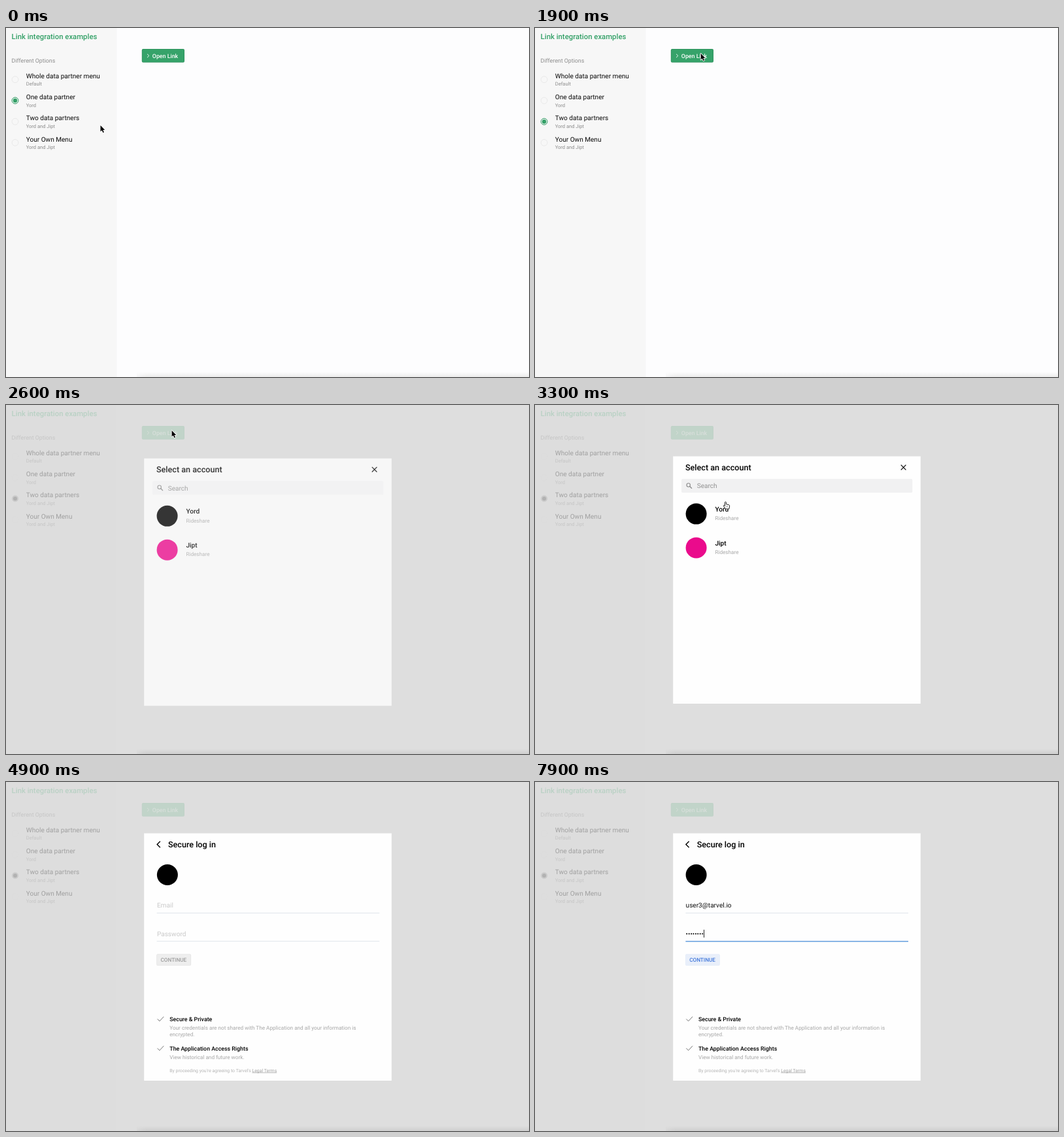
Write an HTML page with a canvas that moves like this. It is 800x534 px and loops after 8 s.

```html
<!DOCTYPE html>
<html lang="en">
<head>
<meta charset="utf-8">
<title>Link integration examples</title>
<style>
  html, body { margin: 0; height: 100%; overflow: hidden; background: #fdfdfe; }
  canvas { display: block; width: 100vw; height: 100vh; }
</style>
</head>
<body>
<canvas id="stage" width="800" height="534"></canvas>
<script>
const ctx = document.getElementById('stage').getContext('2d');
const LOOP = 8000;
const U = 0.63; // page zoom: sizes below are CSS px times U

const OPTIONS = [
  ['Whole data partner menu', 'Default'],
  ['One data partner', 'Yord'],
  ['Two data partners', 'Yord and Jipt'],
  ['Your Own Menu', 'Yord and Jipt'],
];
const ACCOUNTS = [['Yord', '#000'], ['Jipt', '#ea0b8c']];
const EMAIL = 'user3@tarvel.io';

const LIGHT = {
  side: '#f7f7f7', main: '#fdfdfe', green: '#33a067', btn: '#36a36a', edge: '#2d8f5b',
  btnText: '#fff', label: '#0a0a0a', sub: '#8c8c8c', ring: '#e7e7e7', shade: '#ececec',
};
const DIM = {
  side: '#dddddd', main: '#dedede', green: '#b9d1c4', btn: '#c1d4c9', edge: '#bfd1c7',
  btnText: '#d8dfdb', label: '#a0a0a0', sub: '#c5c5c5', ring: '#dcdcdc', shade: '#cecece',
};

// Pointer tip: time, x, y
const POINTER = [
  [0, 144.5, 149], [300, 89.8, 148.3], [1000, 89.8, 148.3], [1600, 266, 44],
  [1900, 253.6, 39], [3000, 253.6, 39], [3500, 312, 207], [3600, 312, 207],
  [4000, 266, 191], [4300, 298.3, 174.5],
];
const ARROW = new Path2D('M0 0V9.6L2.2 7.6L3.9 11.2L5.4 10.5L3.8 7.1H6.7Z');
const HAND = new Path2D('M-1 .9Q0-.6 1 .9V4L5 4.8Q6.4 5.2 6.2 7L5.4 11.2H.2L-3 6.9Q-3.4 5.4-2 5.6L-1 6.6Z');

const clamp = v => Math.max(0, Math.min(1, v));
const ramp = (t, from, to) => clamp((t - from) / (to - from));
const easeOut = u => 1 - (1 - u) ** 3;
const smooth = u => u * u * (3 - 2 * u);

// y is the middle of the capitals
function text(str, x, y, size, color, weight = 400) {
  const px = size * U;
  ctx.font = `${weight} ${px}px Roboto, sans-serif`;
  ctx.fillStyle = color;
  ctx.fillText(str, x, y + px * 0.355);
  return ctx.measureText(str).width;
}

function box(x, y, w, h, fill, r = 0) {
  ctx.fillStyle = fill;
  ctx.beginPath();
  ctx.roundRect(x, y, w, h, r);
  ctx.fill();
}

function disc(x, y, r, fill) {
  ctx.fillStyle = fill;
  ctx.beginPath();
  ctx.arc(x, y, r, 0, 7);
  ctx.fill();
}

function ring(x, y, r, color, width = 1) {
  ctx.strokeStyle = color;
  ctx.lineWidth = width;
  ctx.beginPath();
  ctx.arc(x, y, r, 0, 7);
  ctx.stroke();
}

function line(d, color, width) {
  ctx.strokeStyle = color;
  ctx.lineWidth = width;
  ctx.stroke(new Path2D(d));
}

function layer(alpha, dx, dy, draw) {
  if (alpha <= 0) return;
  ctx.save();
  ctx.globalAlpha = alpha;
  ctx.translate(dx, dy);
  draw();
  ctx.restore();
}

function radio(y, on, dim, c) {
  ring(14, y, 4.9, c.ring, 0.9);
  if (dim && on) {
    disc(14, y, 5, '#cbcbcb');
    disc(14, y, 3, '#b2b2b2');
  } else {
    layer(on, 0, 0, () => {
      ring(14, y, 4.9, c.green);
      disc(14, y, 3.2 * on, c.green);
    });
  }
}

function page(t, dim) {
  const c = dim ? DIM : LIGHT;
  box(0, 0, 800, 534, c.main);
  box(0, 0, 169.5, 534, c.side);
  const glow = ctx.createLinearGradient(0, 526, 0, 534);
  glow.addColorStop(0, c.main);
  glow.addColorStop(1, c.shade);
  box(200, 526, 600, 8, glow);
  const fade = ctx.createLinearGradient(190, 0, 215, 0);
  fade.addColorStop(0, c.main);
  fade.addColorStop(1, c.main + '00');
  box(190, 526, 25, 8, fade);

  text('Link integration examples', 8.6, 13.3, 18, c.green, 500);
  text('Different Options', 8.6, 50, 14, c.sub);
  const moved = ramp(t, 500, 700);
  OPTIONS.forEach(([label, sub], i) => {
    const y = 73.5 + i * 32.2;
    radio(y + 5.3, i === 1 ? 1 - moved : i === 2 ? moved : 0, dim, c);
    text(label, 30.7, y, 16, c.label);
    text(sub, 30.7, y + 12.3, 12, c.sub);
  });

  box(207.8, 32, 65.2, 20.8, c.edge, 2);
  box(208.5, 32.7, 63.8, 19.4, c.btn, 1.5);
  line('M216 39.8L218.8 42.5L216 45.2', c.btnText, 0.9);
  text('Open Link', 223.8, 42.6, 14, c.btnText, 500);
}

function spinner(t) {
  const head = 0.3 + (t - 2300) / 1000 * Math.PI * 2;
  const g = ctx.createConicGradient(head, 401, 267.5);
  g.addColorStop(0, 'rgba(80,80,80,0)');
  g.addColorStop(0.2, 'rgba(80,80,80,0)');
  g.addColorStop(0.5, 'rgba(80,80,80,.5)');
  g.addColorStop(1, 'rgba(60,60,60,1)');
  ring(401, 267.5, 15.3, g, 1.1);
}

function accountList() {
  text('Select an account', 230, 95.6, 20, '#000', 500);
  line('M559.8 91.7L567.4 99.3M567.4 91.7L559.8 99.3', '#000', 1.2);
  box(224, 113, 353.3, 21.3, '#f1f1f2', 2);
  ring(234.7, 122.5, 2.7, '#8b8b8b', 1.1);
  line('M236.7 124.5L240 127.8', '#8b8b8b', 1.3);
  text('Search', 247.7, 123.7, 16, '#929292');
  ACCOUNTS.forEach(([name, color], i) => {
    const y = 166.6 + i * 51.8;
    disc(246.6, y, 16, color);
    text(name, 275.4, y - 7, 16, '#000', 500);
    text('Rideshare', 275.4, y + 6.8, 13, '#a8a8a8');
  });
}

function underline(y, from, to) {
  box(230.4, y - 0.5, 340.6, 1, '#dfe5eb');
  const w = 340.6 * to;
  if (w > from) box(230.4, y - 0.6, w, 1.2, '#4b8fdc');
}

function caret(x, y) {
  box(x, y - 6, 0.9, 12, '#111');
}

function perk(y, title, ...rows) {
  line(`M231.4 ${y}L234.6 ${y + 3.4}L241 ${y - 3.6}`, '#777', 1);
  text(title, 250, y, 14, '#000', 500);
  rows.forEach((row, i) => text(row, 250, y + 13.7 + i * 9.4, 13, '#a6a6a6'));
}

function loginForm(t) {
  const typed = t >= 6500 ? Math.min(8, Math.floor((t - 6500) / 200) + 1) : 0;
  const swap = easeOut(ramp(t, 6200, 6566));
  const focus = easeOut(ramp(t, 4900, 5300));

  line('M235.6 90.8L230.9 95.5L235.6 100.2', '#000', 1.4);
  text('Secure log in', 247.7, 95.6, 20, '#000', 500);
  disc(246.6, 142, 16, ACCOUNTS[0][1]);

  const filled = t >= 5600;
  const w = text(filled ? EMAIL : 'Email', 230.6, 188.6, 16, filled ? '#111' : '#c9c9c9');
  if (t >= 5000 && t < 6100) caret(230.8 + (filled ? w : 0), 188.6);
  underline(200.4, 0, focus * (1 - swap));

  const dots = text(typed ? '•'.repeat(typed) : 'Password', 230.6, 232, 16, typed ? '#111' : '#c9c9c9');
  if (swap > 0) caret(230.8 + (typed ? dots : 0), 232);
  underline(243.8, 0, swap);

  box(230, 263.2, 52.8, 17.8, typed ? '#e3ebf8' : '#e2e2e2', 2);
  box(230.6, 263.8, 51.6, 16.6, typed ? '#e9effa' : '#eeeeee', 1.6);
  text('CONTINUE', 236.2, 272.3, 13, typed ? '#3f76da' : '#9c9c9c', 500);

  perk(362.6, 'Secure & Private',
    'Your credentials are not shared with The Application and all your information is', 'encrypted.');
  perk(407.4, 'The Application Access Rights', 'View historical and future work.');
  const x = 250 + text("By proceeding you're agreeing to Tarvel's ", 250, 441.4, 11, '#b4b4b4');
  const link = text('Legal Terms', x, 441.4, 11, '#a0a0a0');
  box(x, 444.6, link, 0.6, '#a0a0a0');
}

function modal(t) {
  const shown = easeOut(ramp(t, 2400, 2900));
  layer(shown, 0, 15 * (1 - shown), () => {
    box(211.2, 78.4, 378.6, 378.6, '#fefefe');
    ctx.beginPath();
    ctx.rect(211.2, 78.4, 378.6, 378.6);
    ctx.clip();
    if (t < 4500) return accountList();
    const enter = easeOut(ramp(t, 4400, 5000));
    layer(1 - ramp(t, 4400, 4600), 0, 0, accountList);
    layer(enter, 60 * (1 - enter), 0, () => loginForm(t));
  });
}

function pointer(t) {
  if (t >= 4500) return;
  let i = POINTER.findIndex(p => p[0] > t);
  if (i < 0) i = POINTER.length;
  const a = POINTER[i - 1], b = POINTER[i] || a;
  const u = a === b ? 0 : smooth(ramp(t, a[0], b[0]));
  const x = a[1] + (b[1] - a[1]) * u, y = a[2] + (b[2] - a[2]) * u;
  const hand = t > 3000 && y > 142;
  ctx.save();
  ctx.translate(x, y);
  ctx.lineJoin = 'round';
  ctx.lineWidth = hand ? 1 : 1.6;
  ctx.strokeStyle = hand ? '#222' : '#fff';
  ctx.fillStyle = hand ? '#fff' : '#000';
  if (hand) {
    ctx.fill(HAND);
    ctx.stroke(HAND);
    line('M1.4 6.4V8.6M3 6.6V8.6', '#555', 0.6);
  } else {
    ctx.stroke(ARROW);
    ctx.fill(ARROW);
  }
  ctx.restore();
}

function draw(now) {
  const t = Math.floor(now % LOOP / 100) * 100; // ten pictures a second
  const dim = t >= 2300;
  page(t, dim);
  if (dim && t < 2500) spinner(t);
  if (dim) modal(t);
  pointer(t);
}

ctx.textRendering = 'geometricPrecision';
const start = performance.now();
(function tick() {
  draw(performance.now() - start);
  requestAnimationFrame(tick);
})();
</script>
</body>
</html>
```
